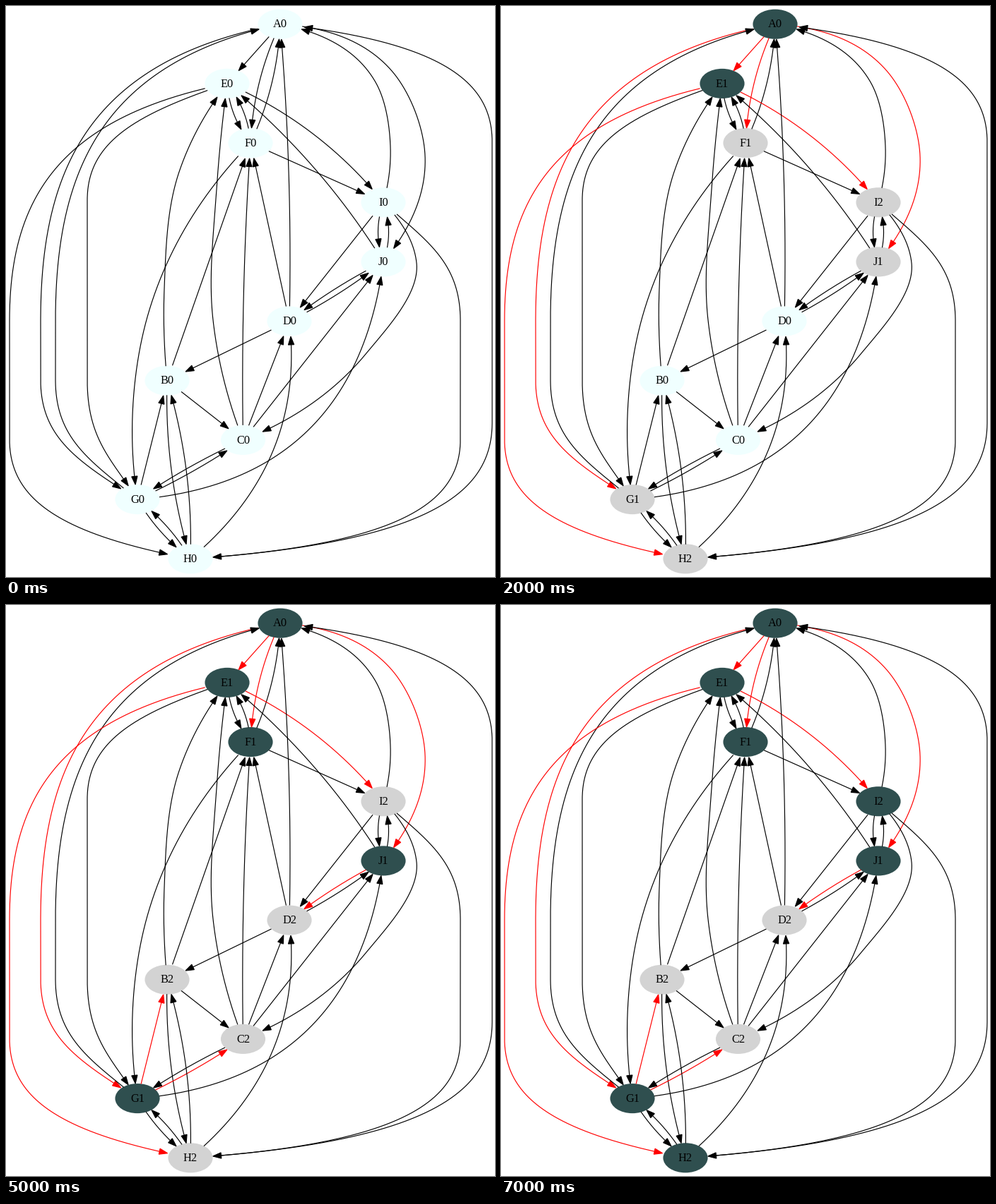
A matplotlib script that plays this animation: 692 by 809 pixels, repeating every 8 s.

```python
import numpy as np
import matplotlib.pyplot as plt
from matplotlib.animation import FuncAnimation
from matplotlib.patches import Ellipse, Polygon

W, H, DPI = 692, 809, 64
S = 809 / 692  # layout points to pixels
PT = 72 / DPI  # pixels to font and line units
RADII = S * np.array([27, 18])
HEAD, HALF = 10 * S, 3.5 * S  # arrowhead length and half width
NEW, SEEN, DONE = "#f0ffff", "#d3d3d3", "#2f4f4f"

# x of each node, one node per rank from top to bottom
XS = {"A": 388, "E": 313, "F": 346, "I": 534, "J": 534,
      "D": 401, "B": 228, "C": 335.5, "G": 186, "H": 261}
RANK = {name: i for i, name in enumerate(XS)}
POS = {name: np.array([x, (22 + 72 * RANK[name]) * S]) for name, x in XS.items()}

fig = plt.figure(figsize=(W / DPI, H / DPI), dpi=DPI, facecolor="white")
ax = fig.add_axes([0, 0, 1, 1])
ax.set(xlim=(0, W), ylim=(H, 0))
ax.axis("off")

ovals, labels, edges = {}, {}, {}
for name, (x, y) in POS.items():
    ovals[name] = ax.add_patch(Ellipse((x, y), *(2 * RADII), lw=0, zorder=1))
    labels[name] = ax.text(x, y + 4.7, "", fontsize=14 * S * PT, ha="center",
                           va="baseline", family="Liberation Serif", zorder=2)


def bezier(a, b, c, d):
    t = np.linspace(0, 1, 200)[:, None]
    return ((1 - t)**3 * a + 3 * t * (1 - t)**2 * b
            + 3 * t**2 * (1 - t) * c + t**3 * d)


def smooth(points):
    """Curve through all points, with slopes from their neighbours."""
    p = np.array(points, float)
    step = np.hypot(*np.diff(p, axis=0).T)
    slope = np.gradient(p, np.r_[0, np.cumsum(step)], axis=0,
                        edge_order=min(2, len(p) - 1))
    return np.vstack([bezier(p[i], p[i] + slope[i] * h / 3,
                             p[i + 1] - slope[i + 1] * h / 3, p[i + 1])
                      for i, h in enumerate(step)])


def draw(ends, curve):
    """Clip a centre-to-centre curve at both ovals and add the arrowhead."""
    for name in ends:
        outside = np.hypot(*((curve - POS[name]) / RADII).T) > 1
        curve = curve[outside]
    tip = curve[-1]
    curve = curve[np.hypot(*(curve - tip).T) > HEAD]
    along = (tip - curve[-1]) / np.hypot(*(tip - curve[-1]))
    base = tip - HEAD * along
    side = HALF * np.array([-along[1], along[0]])
    line, = ax.plot(*np.vstack([curve, base]).T, lw=S * PT, zorder=3)
    head = Polygon([base + side, tip, base - side], lw=S * PT,
                   joinstyle="miter", zorder=3)
    edges[ends] = line, ax.add_patch(head)


def via(ends, *points):
    draw(ends, smooth([POS[ends[0]], *points, POS[ends[1]]]))


def turn(node, corner):
    """Leave a node sideways and bend into a vertical lane."""
    d = corner - node
    steep = max(0.15, 0.8 - abs(d[0]) / 500)
    out = 0.9 - 0.6 * steep
    return bezier(node, node + d * [out, out * steep],
                  corner - d * [0, 0.5], corner)


def lane(ends, x, top, bottom):
    upper, lower = sorted(ends, key=RANK.get)
    curve = np.vstack([turn(POS[upper], np.array([x, top])),
                       turn(POS[lower], np.array([x, bottom]))[::-1]])
    draw(ends, curve if ends[0] == upper else curve[::-1])


# Direct edges are straight; opposite pairs bow apart.
direct = "AE AF EF FA FE FI ID IJ JD JI DB DF DJ BC BF BH CD CG CJ GB GC GH HB HG"
direct = direct.split()
for ends in direct:
    a, b = ends
    if b + a in direct:
        ranks = RANK[a] - RANK[b]
        bow = np.sign(ranks) * (6 + 1.5 * abs(ranks))
        via(ends, (POS[a] + POS[b]) / 2 + [bow, 0])
    else:
        via(ends)

via("AJ", (546, 92), (593, 212))
via("IA", (544, 200), (523, 108))
via("IC", (581, 364), (510, 492))
via("EI", (433, 180))
via("JE", (440, 234))
via("FG", (201, 437), (179, 580))
via("BE", (224, 400), (245, 235))
via("CE", (293, 445), (298, 260))
via("CF", (336.5, 400))
via("DA", (400.5, 250))
via("GJ", (418, 610))
via("HD", (391, 592))

lane("AG", 49, 446, 530)
lane("GA", 70, 446, 530)
lane("EG", 115, 275, 530)
lane("EH", 5, 446, 614)
lane("IH", 643, 446, 614)
lane("HA", 688, 193, 590)


def search(steps):
    """Breadth-first search from A, stopped after some expanded nodes."""
    depth, tree, queue = {"A": 0}, set(), ["A"]
    for i in range(steps):
        node = queue[i]
        for nxt in sorted(e[1] for e in edges if e[0] == node):
            if nxt not in depth:
                depth[nxt] = depth[node] + 1
                tree.add(node + nxt)
                queue.append(nxt)
    return depth, tree, queue[:steps]


def update(step):
    depth, tree, done = search(step)
    for name in XS:
        seen = step > 0 and name in depth
        ovals[name].set_facecolor(DONE if name in done else SEEN if seen else NEW)
        labels[name].set_text(f"{name}{depth.get(name, 0)}")
    for ends, parts in edges.items():
        for part in parts:
            part.set_color("red" if ends in tree else "black")
    return []


anim = FuncAnimation(fig, update, frames=8, interval=1000,
                     init_func=lambda: update(0), repeat=True, repeat_delay=0)
plt.show()
```
